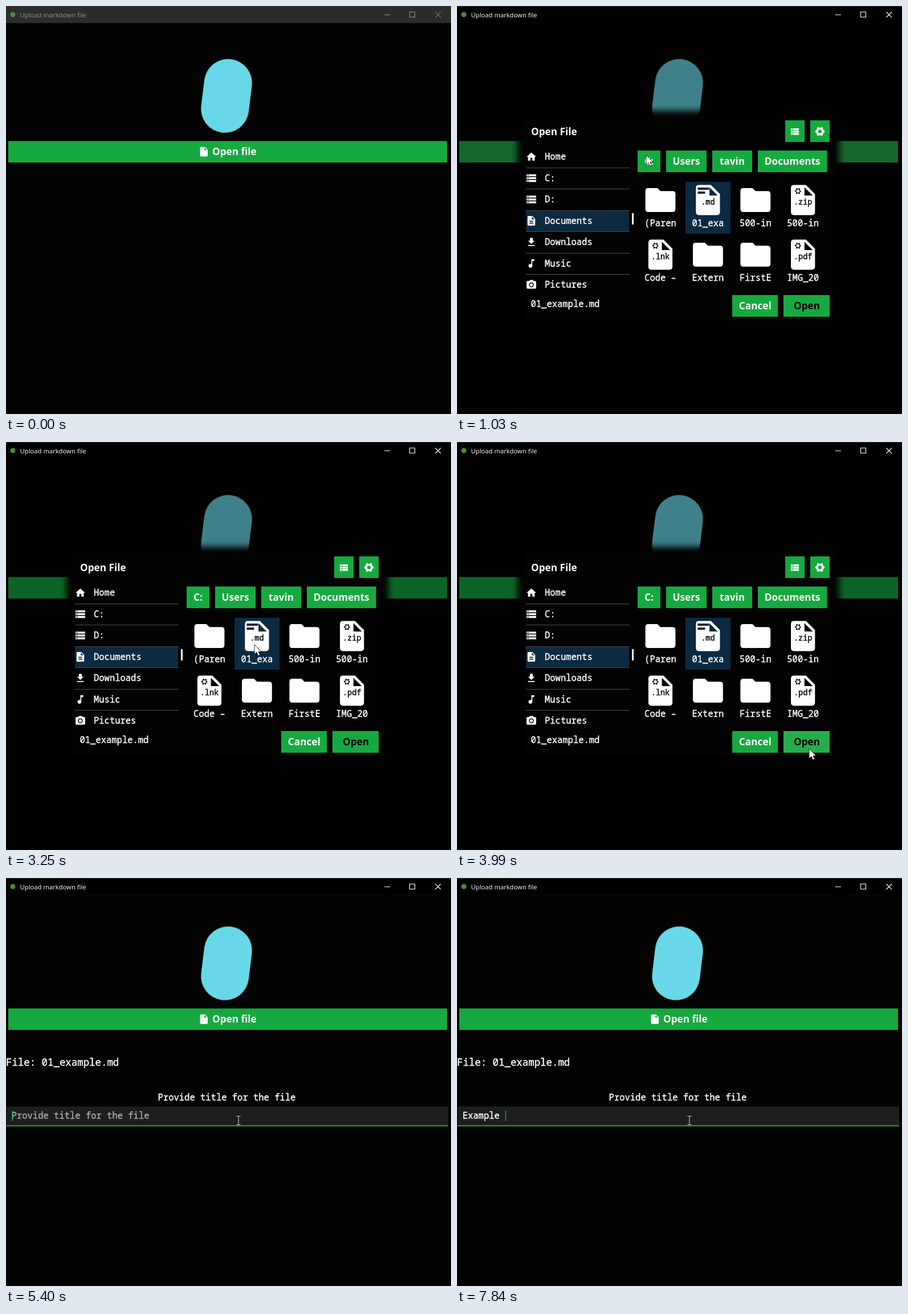
An HTML page for the animation above (8 s loop, 781 by 717 pixels).

```html
<!DOCTYPE html>
<html lang="en">
<head>
<meta charset="utf-8">
<title>Upload markdown file</title>
<style>
  @property --typed { syntax: '<integer>'; inherits: true; initial-value: 0; }

  html, body { margin: 0; width: 100%; height: 100%; overflow: hidden; background: #030303; }
  svg { display: block; width: 100%; height: 100%; color: #fff; }
  text { fill: currentColor; white-space: pre; }
  .mono {
    font: 500 15.5px "Noto Sans Mono", "DejaVu Sans Mono", monospace;
    stroke: currentColor; stroke-width: .4px;
  }
  .bold { font: 700 17.2px "Noto Sans", "Open Sans", sans-serif; }
  .caption { font: 11.3px "Open Sans", "Noto Sans", sans-serif; }
  .mid { text-anchor: middle; }
  .dark { color: #020202; }
  .green { fill: #16a93f; }
  .picked { fill: #0c2a42; }
  .icon { fill: #fff; fill-rule: evenodd; }

  /* One loop is 8000 ms, so 1% is 80 ms. */
  .timed { animation: 8s step-end infinite; }
  .idle { animation-name: idle; }
  .active { animation-name: active; }
  .top { animation-name: shift; }
  .pressed { animation-name: pressed; }
  .dialog { animation-name: dialog; }
  .row-hover { animation-name: row-hover; }
  .open-hover { animation-name: open-hover; }
  .form { animation-name: form; }
  .hint { animation-name: hint; }
  .entry { animation-name: typing; }
  .typed-area { width: calc(var(--typed) * 9.3px); }
  .caret-place { transform: translateX(calc(var(--typed) * 9.3px)); }
  .caret { animation: caret 8s linear infinite; }
  .pointer { animation: pointer 8s linear infinite; }
  .pointer-on { animation-name: pointer-on; }
  .arrow { animation-name: arrow; }
  .beam { animation-name: beam; }

  @keyframes idle { 0% { opacity: 1 } 11.375%, 100% { opacity: 0 } }
  @keyframes active { 0% { opacity: 0 } 11.375%, 100% { opacity: 1 } }
  @keyframes shift { 0% { transform: none } 53.25%, 100% { transform: translateY(-8px) } }
  @keyframes pressed { 0% { opacity: 0 } 11.375% { opacity: .06 } 15.375%, 100% { opacity: 0 } }
  @keyframes dialog { 0% { opacity: 0 } 12.125% { opacity: 1 } 53.25%, 100% { opacity: 0 } }
  @keyframes row-hover { 0% { opacity: 0 } 22% { opacity: 1 } 30.5%, 100% { opacity: 0 } }
  @keyframes open-hover { 0% { opacity: 0 } 45% { opacity: .06 } 53.25%, 100% { opacity: 0 } }
  @keyframes form { 0% { opacity: 0 } 53.25%, 100% { opacity: 1 } }
  @keyframes hint { 0% { opacity: 1 } 80.25%, 100% { opacity: 0 } }
  @keyframes typing {
    0% { --typed: 0 } 80.25% { --typed: 1 } 83.5% { --typed: 2 } 86% { --typed: 3 }
    86.875% { --typed: 4 } 89.375% { --typed: 5 } 91.875% { --typed: 6 }
    95.25% { --typed: 7 } 98%, 100% { --typed: 8 }
  }
  @keyframes caret {
    0%, 64.86% { opacity: 0 } 64.875%, 67.1% { opacity: 1 }
    71.5%, 74.2% { opacity: 0 } 77.75%, 100% { opacity: 1 }
  }
  @keyframes pointer-on { 0% { opacity: 0 } 3%, 100% { opacity: 1 } }
  @keyframes arrow { 0% { opacity: 1 } 61.8%, 100% { opacity: 0 } }
  @keyframes beam { 0% { opacity: 0 } 61.8%, 100% { opacity: 1 } }
  @keyframes pointer {
    0%, 3% { transform: translate(677px, 663px); animation-timing-function: ease-in-out }
    8.75% { transform: translate(322px, 263px) }
    9.625%, 14.5% { transform: translate(332px, 262px); animation-timing-function: ease-in-out }
    21.25%, 22% { transform: translate(229px, 439px) }
    24.625%, 29.6% { transform: translate(220px, 404px) }
    29.625%, 30.4% { transform: translate(211px, 394px); animation-timing-function: ease-in }
    33.5% { transform: translate(400px, 320px); animation-timing-function: ease-out }
    36.25%, 40.625% { transform: translate(436px, 356px); animation-timing-function: ease-in-out }
    45.625%, 49% { transform: translate(620px, 541px) }
    49.8%, 53.2% { transform: translate(618px, 539px) }
    53.25%, 54.1% { transform: translate(619px, 541px); animation-timing-function: ease-in-out }
    63.25%, 100% { transform: translate(408px, 426px) }
  }
</style>
</head>
<body>
<svg viewBox="0 0 781 717">
  <defs>
    <path id="home" d="M10 20v-6h4v6h5v-8h3L12 3 2 12h3v8z"/>
    <path id="drive" d="M2 20h20v-4H2zm2-3h2v2H4zM2 4v4h20V4zm4 3H4V5h2zm-4 7h20v-4H2zm2-3h2v2H4z"/>
    <path id="page" d="M6 2q-2 0-2 2v16q0 2 2 2h12q2 0 2-2V8l-6-6zm7 7V3.5L18.5 9z"/>
    <path id="doc" d="M6 2q-2 0-2 2v16q0 2 2 2h12q2 0 2-2V8l-6-6zm10 16H8v-2h8zm0-4H8v-2h8zm-3-5V3.5L18.5 9z"/>
    <path id="down" d="M19 9h-4V3H9v6H5l7 7zM5 18v2h14v-2z"/>
    <path id="note" d="M12 3v10.5a4 4 0 1 0 2 3.5V7h4V3z"/>
    <path id="camera" d="M9 2 7.2 4H4q-2 0-2 2v12q0 2 2 2h16q2 0 2-2V6q0-2-2-2h-3.2L15 2zm3 5a5 5 0 1 1 0 10 5 5 0 1 1 0-10zm0 1.8a3.2 3.2 0 1 0 0 6.4 3.2 3.2 0 1 0 0-6.4z"/>
    <path id="folder" d="M10 4H4Q2 4 2 6v12q0 2 2 2h16q2 0 2-2V8q0-2-2-2h-8z"/>
    <path id="list" d="M4 5h4v4H4zm0 5h4v4H4zm0 5h4v4H4zM9 5h12v4H9zm0 5h12v4H9zm0 5h12v4H9z"/>
    <g id="gear" fill="none">
      <circle cx="12" cy="12" r="6" style="stroke-width:var(--ring)"/>
      <circle cx="12" cy="12" r="8.4" stroke-width="2.8" pathLength="12" stroke-dasharray="1" stroke-dashoffset=".5"/>
    </g>
    <path id="window-buttons" fill="none" d="M664 15.5h10M708.5 10.5h9v9h-9zM753.5 10.5l9.500 9.500m0-9.500l-9.500 9.500"/>
  </defs>

  <rect width="781" height="717" fill="#030303"/>

  <g class="timed top">
    <rect x="345" y="93" width="84" height="130" rx="42" fill="#68d8e8" transform="rotate(7 387 158)"/>
    <rect class="green" x="4" y="237.3" width="770" height="37.7"/>
    <rect class="timed pressed" x="4" y="237.3" width="770" height="37.7" fill="#fff"/>
    <use class="icon" href="#page" transform="translate(337.2 246) scale(.84)"/>
    <text class="bold" x="362" y="262">Open file</text>
  </g>

  <g class="timed form">
    <text class="mono" x="0" y="330" style="font-size:17.4px">File: 01_example.md</text>
    <text class="mono mid" x="387.5" y="391">Provide title for the file</text>
    <rect x="1" y="401.6" width="775" height="33.4" fill="#1e1e1e"/>
    <rect class="green" x="1" y="434.5" width="775" height="2"/>
    <text class="mono timed hint" x="9.7" y="423" color="#a8a8a8">Provide title for the file</text>
    <g class="timed entry">
      <clipPath id="typed-clip"><rect class="typed-area" x="9.7" y="404" height="28"/></clipPath>
      <text class="mono" x="9.7" y="423" clip-path="url(#typed-clip)">Example </text>
      <g class="caret-place"><rect class="green caret" x="10.2" y="409" width="1.6" height="18"/></g>
    </g>
  </g>

  <g class="timed dialog">
    <rect y="30" width="781" height="687" opacity=".4"/>
    <rect x="106" y="184" width="565" height="378" style="filter:blur(6px)"/>
    <rect x="116" y="194" width="545" height="358" fill="#020202"/>
    <text class="bold" x="130" y="227">Open File</text>
    <rect class="green" x="576" y="201" width="34" height="38"/>
    <use class="icon" href="#list" transform="translate(582.6 210.8) scale(.83)"/>
    <rect class="green" x="620" y="201" width="34" height="38"/>
    <use href="#gear" stroke="#fff" style="--ring:4.4" transform="translate(627 210.5) scale(.83)"/>
    <g id="crumbs"></g>
    <rect class="picked" x="121" y="359" width="181" height="37"/>
    <rect class="timed row-hover" x="121" y="397" width="181" height="37" fill="#151515"/>
    <g id="places"></g>
    <rect x="307" y="364" width="3" height="20" fill="#fff"/>
    <rect class="picked" x="401" y="309" width="79" height="91"/>
    <g id="files"></g>
    <text class="mono" x="129.5" y="529">01_example.md</text>
    <rect class="green" x="483" y="508" width="80" height="38"/>
    <text class="bold mid" x="523.3" y="533">Cancel</text>
    <rect class="green" x="573" y="508" width="81" height="38"/>
    <rect class="timed open-hover" x="573" y="508" width="81" height="38" fill="#fff"/>
    <text class="bold mid dark" x="614" y="533">Open</text>
  </g>

  <g class="timed active">
    <rect width="781" height="30"/>
    <rect width="781" height="1" fill="#303030"/>
    <text class="caption" x="24.5" y="20">Upload markdown file</text>
    <use href="#window-buttons" stroke="#fff" stroke-width="1.2"/>
  </g>
  <g class="timed idle">
    <rect width="781" height="30" fill="#2b2c2c"/>
    <text class="caption" x="24.5" y="20" color="#919191">Upload markdown file</text>
    <use href="#window-buttons" stroke="#999"/>
  </g>
  <circle cx="12" cy="15" r="4.5" fill="#4d8a3c"/>

  <g class="timed pointer-on">
    <g class="pointer">
      <path class="timed arrow" d="M0 0v17l4-3.6 2.6 6.2 3-1.2-2.6-6h5.2z" fill="#fff" stroke="#000" stroke-width=".8"/>
      <path class="timed beam" d="M-3.5-7.5h3l.5.5.5-.5h3M0-7V7M-3.5 7.5h3L0 7l.5.5h3" fill="none" stroke="#ddd"/>
    </g>
  </g>
</svg>
<script>
  const fill = (id, items, draw) => {
    document.getElementById(id).innerHTML = items.map(draw).join('');
  };
  const icon = (name, cx, cy, scale) =>
    `<use class="icon" href="#${name}" transform="translate(${cx} ${cy}) scale(${scale}) translate(-12 -12)"/>`;

  fill('crumbs', [['C:', 317, 40], ['Users', 367, 71], ['tavin', 448, 70], ['Documents', 528, 121.5]],
    ([label, x, width]) => `<rect class="green" x="${x}" y="254" width="${width}" height="38"/>
      <text class="bold mid" x="${x + width / 2}" y="279">${label}</text>`);

  fill('places', [['Home', 'home'], ['C:', 'drive'], ['D:', 'drive'], ['Documents', 'doc'],
    ['Downloads', 'down'], ['Music', 'note'], ['Pictures', 'camera']],
    ([label, name], i) => {
      const y = 265 + i * 37.5;
      const line = i < 6 ? `<rect x="121" y="${Math.round(y + 18.5)}" width="182" height="1" fill="#4c4c4c"/>` : '';
      return `${line}${icon(name, 130.5, y, .84)}<text class="mono" x="154" y="${y + 5}">${label}</text>`;
    });

  const badge = (type, x, y) => type === '.md'
    ? `<path class="picked" d="M${x - 18} ${y - 22}h20v4h-20zm0 7h13v4h-13z"/>`
    : `<use href="#gear" stroke="#020202" style="--ring:2.4" transform="translate(${x - 15.5} ${y - 22.5}) scale(.56)"/>`;

  fill('files', [['(Paren'], ['01_exa', '.md'], ['500-in'], ['500-in', '.zip'],
    ['Code –', '.lnk'], ['Extern'], ['FirstE'], ['IMG_20', '.pdf']],
    ([label, type], i) => {
      const x = 357 + (i % 4) * 83.4, y = 341 + Math.floor(i / 4) * 96;
      const mark = type ? `${badge(type, x, y)}<text class="mono mid dark" x="${x}" y="${y + 8}"
        style="font-size:13.5px">${type}</text>` : '';
      return `${icon(type ? 'page' : 'folder', x, y, 2.64)}${mark}
        <text class="mono mid" x="${x}" y="${y + 46}">${label}</text>`;
    });
</script>
</body>
</html>
```
